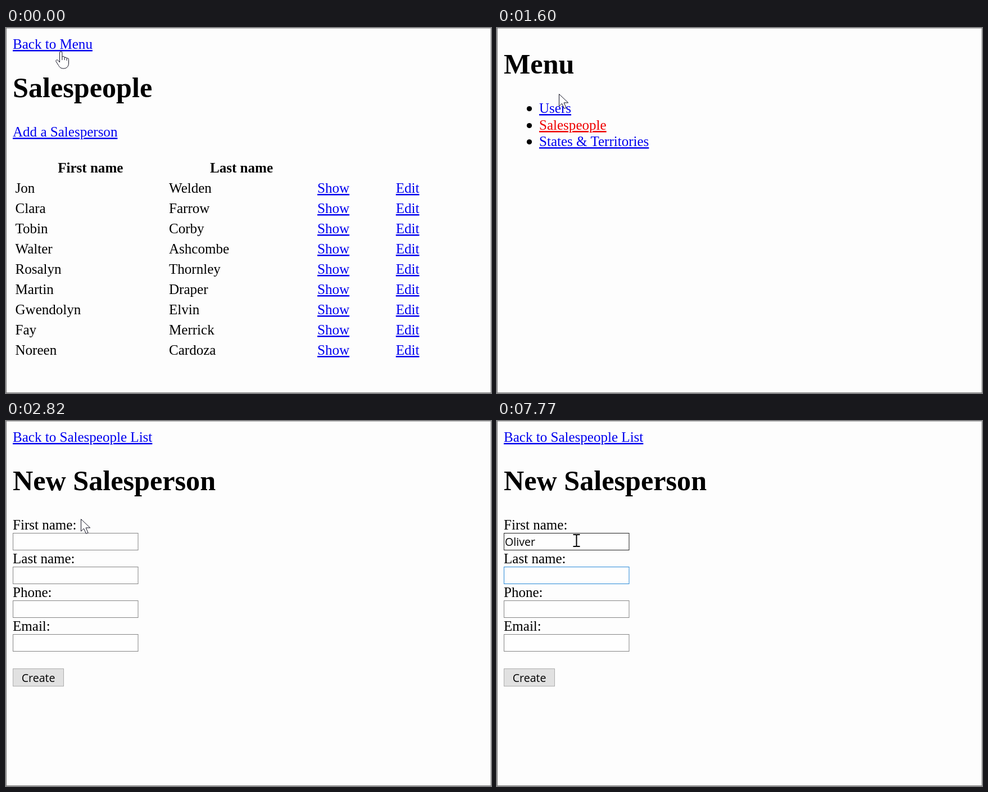
These frames come from a looping animation (863 px wide and 649 px high, 8 s). An HTML page:

```html
<!DOCTYPE html>
<html lang="en">
<head>
<meta charset="utf-8">
<title>Salespeople</title>
<style>
html, body { margin: 0; width: 100%; height: 100%; overflow: hidden; background: #fdfdfd; }
svg { display: block; width: 100%; height: 100%; }
text { font: 25.06px "Liberation Serif", serif; white-space: pre; }
.title { font-size: 50.2px; font-weight: bold; }
.head { font-weight: bold; text-anchor: middle; }
.ui { font: 500 19.6px "Open Sans", sans-serif; }
.link {
  fill: #00e;
  text-decoration: underline 1px;
  text-underline-offset: 3px;
  text-decoration-skip-ink: none;
}
.link.active { fill: #e00; }
.field { fill: #fefefe; stroke: #858585; }
.field.hover { stroke: #222; }
.field.focus { stroke: #2a8ad8; }
.cursor { fill: #fff; stroke: #112; stroke-linejoin: round; }
#beam { fill: none; stroke: #000; stroke-width: 2; }
</style>
</head>
<body>
<svg viewBox="0 0 863 649" preserveAspectRatio="none">
  <g id="list"></g>
  <g id="menu"></g>
  <g id="form"></g>
  <rect id="caret" width="1.4" height="26"/>
  <path id="hand" class="cursor" d="M7.5 20V3a2.2 2.2 0 0 1 4.4 0V10q4-1.5 4.2 1.5q3.8-1.3 4 1.3q3.6-.8 3.4 2.6V21c0 6-3 10-9 10c-5 0-7-2-9-5.5L1 18.5c-1-2.5 2-3.8 3.8-1.8zM11.9 10v6M16.1 11.5V16M20.1 13v4"/>
  <path id="arrow" class="cursor" d="M.5 .5V22l5-4.7 4 9 3.6-1.6-4-8.8h7.6z"/>
  <path id="beam" class="cursor" d="M.5 2H5q1.5 0 1.5 1.5Q6.5 2 8 2h4.5M6.5 3V22M.5 23H5q1.5 0 1.5-1.5Q6.5 23 8 23h4.5"/>
  <path d="M0 .5H863M862.5 0V649" stroke="#aaa"/>
  <path d="M.5 0V649M0 648.5H863" stroke="#777"/>
</svg>
<script>
const LOOP = 8000;
const byId = id => document.getElementById(id);

function add(parent, tag, attrs, content = '') {
  const node = document.createElementNS('http://www.w3.org/2000/svg', tag);
  for (const key in attrs) node.setAttribute(key, attrs[key]);
  node.textContent = content;
  return parent.appendChild(node);
}
const write = (parent, x, y, content, style = '') =>
  add(parent, 'text', { x, y, class: style }, content);

const pages = { list: byId('list'), menu: byId('menu'), form: byId('form') };
const { list, menu, form } = pages;

const backLink = write(list, 12, 37, 'Back to Menu', 'link');
write(list, 12, 123, 'Salespeople', 'title');
const addLink = write(list, 12, 193, 'Add a Salesperson', 'link');
write(list, 150.3, 257, 'First name', 'head');
write(list, 419, 257, 'Last name', 'head');
['Jon Welden', 'Clara Farrow', 'Tobin Corby', 'Walter Ashcombe', 'Rosalyn Thornley',
 'Martin Draper', 'Gwendolyn Elvin', 'Fay Merrick', 'Noreen Cardoza'].forEach((name, i) => {
  const y = 293 + 36 * i, [first, last] = name.split(' ');
  write(list, 16.5, y, first);
  write(list, 290, y, last);
  write(list, 554, y, 'Show', 'link');
  write(list, 693.7, y, 'Edit', 'link');
});

write(menu, 12, 81, 'Menu', 'title');
const menuLinks = ['Users', 'Salespeople', 'States & Territories'].map((label, i) => {
  const y = Math.round(151 + 29.6 * i);
  add(menu, 'circle', { cx: 57.5, cy: y - 7.5, r: 4.6 });
  return write(menu, 75, y, label, 'link');
});

write(form, 12, 37, 'Back to Salespeople List', 'link');
write(form, 12, 123, 'New Salesperson', 'title');
const fields = ['First name:', 'Last name:', 'Phone:', 'Email:'].map((label, i) => {
  const y = 193 + 60 * i;
  write(form, 12, y, label);
  return add(form, 'rect', { x: 12.5, y: y + 6.5, width: 222.5, height: 30, class: 'field' });
});
const typed = write(form, 14, 222, '', 'ui');
add(form, 'rect', { x: 12.5, y: 440.5, width: 90, height: 31, fill: '#e1e1e1', stroke: '#adadad' });
write(form, 27.7, 464, 'Create', 'ui');

// Each track holds [start time, ...values]; values stay until the next entry.
const pageTrack = [[0, 'list'], [640, 'menu'], [2670, 'list'], [2820, 'form']];
const typingTrack = [[0, ''], [5750, 'O'], [6180, 'Oliv'], [6350, 'Olive'], [6740, 'Oliver']];
const firstFieldTrack = [[0, ''], [3790, 'hover'], [4480, 'focus'], [4610, 'hover']];
const caretTrack = [[0, -1], [4610, 0], [5010, -1], [5470, 0], [7190, 1], [7770, -1]];
const cursorTrack = [
  [0, 'hand', 88, 41], [140, 'hand', 85, 27], [510, 'hand', 90, 29],
  [640, 'arrow', 120, 90], [760, 'hand', 148, 153], [910, 'hand', 140.5, 165],
  [1040, 'hand', 139, 169], [1190, 'hand', 139, 175], [1470, 'hand', 133, 165],
  [1600, 'arrow', 110, 117], [1720, 'hand', 100, 130], [1850, 'hand', 97, 142],
  [1990, 'hand', 111, 166], [2120, 'hand', 125, 187], [2260, 'hand', 123.5, 174],
  [2820, 'arrow', 133, 174], [3230, 'arrow', 134, 172], [3380, 'beam', 149, 95],
  [3530, 'beam', 153, 79], [3650, 'arrow', 150, 155], [3790, 'beam', 140, 195],
  [3920, 'beam', 135, 208], [4070, 'beam', 135, 217], [4210, 'beam', 135, 200]
];
const at = (track, t) => track.findLast(entry => entry[0] <= t).slice(1);
const show = (node, on) => node.setAttribute('visibility', on ? 'visible' : 'hidden');
const between = (t, start, end) => t >= start && t < end;

function render(t) {
  const [page] = at(pageTrack, t);
  for (const name in pages) show(pages[name], name === page);

  backLink.classList.toggle('active', between(t, 380, 640));
  menuLinks[1].classList.toggle('active', between(t, 1340, 2670));
  addLink.classList.toggle('active', between(t, 2670, 2820));

  typed.textContent = at(typingTrack, t)[0];
  fields[0].setAttribute('class', 'field ' + at(firstFieldTrack, t)[0]);
  fields[1].setAttribute('class', t >= 7190 ? 'field focus' : 'field');

  const [caretField] = at(caretTrack, t);
  const caret = byId('caret');
  show(caret, caretField >= 0);
  caret.setAttribute('x', 14.3 + (caretField === 0 && typed.textContent ? typed.getComputedTextLength() - 1 : 0));
  caret.setAttribute('y', 201.8 + 60 * Math.max(caretField, 0));

  const [kind, x, y] = at(cursorTrack, t);
  for (const name of ['hand', 'arrow', 'beam']) show(byId(name), name === kind);
  byId(kind).setAttribute('transform', `translate(${x} ${y})`);
}

const start = performance.now();
function tick() {
  render((performance.now() - start) % LOOP);
  requestAnimationFrame(tick);
}
tick();
</script>
</body>
</html>
```
